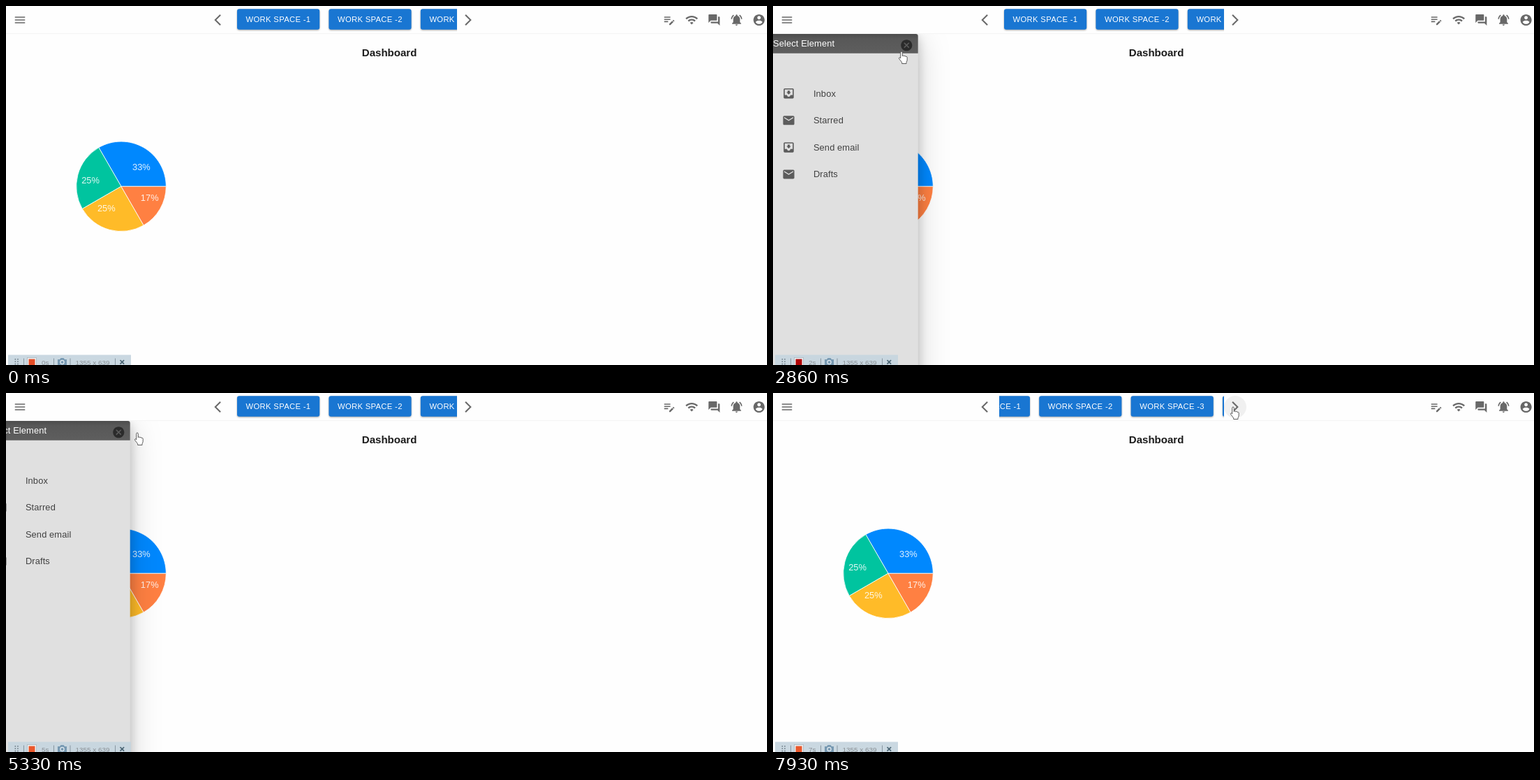
Recreate the animation shown at these times as an HTML page. Size 1090 by 514 pixels, loop 8 s.

```html
<!DOCTYPE html>
<html lang="en">
<head>
<meta charset="utf-8">
<title>Dashboard</title>
<style>
  html, body { margin: 0; width: 100%; height: 100%; overflow: hidden; background: #fefefe; }
  svg { display: block; width: 100%; height: 100%; }
  text { font: 12.87px "Liberation Sans", Arial, sans-serif; dominant-baseline: central; white-space: pre; }
  .title { font-size: 15.06px; font-weight: bold; fill: #1c1c1c; }
  .button rect { fill: #1976d2; filter: drop-shadow(0 1px 1.2px rgba(0,0,0,.35)); }
  .button text { font-size: 11.26px; letter-spacing: .322px; fill: #fff; }
  .icon { fill: #686868; }
  .halo { fill: #f0f0f0; }
  .slice { stroke: #fff; stroke-width: .8; }
  .percent { fill: #fff; fill-opacity: .88; }
  .panel { fill: #e0e0e0; filter: drop-shadow(0 5px 8px rgba(0,0,0,.2)) drop-shadow(0 8px 22px rgba(0,0,0,.18)); }
  .drawer text { letter-spacing: .12px; fill: #404040; }
  .drawer .heading { fill: #fff; }
  .drawer .icon { fill: #5c5c5c; }
  .drawer .close { fill: #2b2b2b; }
  .recorder text { font-size: 9.9px; fill: #8a9095; }
  #cursor path { fill: #fff; stroke: #4c4c4c; stroke-width: .9; stroke-linejoin: round; }
</style>
</head>
<body>
<svg id="stage" viewBox="0 0 1090 514">
  <defs>
    <clipPath id="carouselClip"><rect x="324" width="322" height="39"/></clipPath>
    <clipPath id="pageClip"><rect y="40" width="1090" height="474"/></clipPath>
    <linearGradient id="headerFill" x2="0" y2="1">
      <stop stop-color="#4c4c4c"/><stop offset=".25" stop-color="#585858"/><stop offset="1" stop-color="#5e5e5e"/>
    </linearGradient>
  </defs>
</svg>
<script>
const LOOP = 8000, STEP = 130;
const SCALE = .8044;
const ROW_TOP = 106, ROW_HEIGHT = 38.6;

const ICONS = {
  menu: 'M3 18h18v-2H3v2zm0-5h18v-2H3v2zm0-7v2h18V6H3z',
  back: 'M17.77 3.77 16 2 6 12l10 10 1.77-1.77L9.54 12z',
  next: 'M6.23 20.23 8 22l10-10L8 2 6.23 3.77 14.46 12z',
  note: 'M3 10h11v2H3v-2zm0-2h11V6H3v2zm0 8h7v-2H3v2zm15.01-3.13.71-.71c.39-.39 1.02-.39 1.41 0l.71.71c.39.39.39 1.02 0 1.41l-.71.71-2.12-2.12zm-.71.71-5.3 5.3V21h2.12l5.3-5.3-2.12-2.12z',
  wifi: 'm1 9 2 2c4.97-4.97 13.03-4.97 18 0l2-2C16.93 2.93 7.08 2.93 1 9zm8 8 3 3 3-3c-1.65-1.66-4.34-1.66-6 0zm-4-4 2 2c2.76-2.76 7.24-2.76 10 0l2-2C15.14 9.14 8.87 9.14 5 13z',
  chat: 'M21 6h-2v9H6v2c0 .55.45 1 1 1h11l4 4V7c0-.55-.45-1-1-1zm-4 6V3c0-.55-.45-1-1-1H3c-.55 0-1 .45-1 1v14l4-4h10c.55 0 1-.45 1-1z',
  bell: 'M7.58 4.08 6.15 2.65C3.75 4.48 2.17 7.3 2.03 10.5h2c.15-2.65 1.51-4.97 3.55-6.42zm12.39 6.42h2c-.15-3.2-1.73-6.02-4.12-7.85l-1.42 1.43c2.02 1.45 3.39 3.77 3.54 6.42zM18 11c0-3.07-1.64-5.64-4.5-6.32V4c0-.83-.67-1.5-1.5-1.5s-1.5.67-1.5 1.5v.68C7.63 5.36 6 7.92 6 11v5l-2 2v1h16v-1l-2-2v-5zm-6 11c.14 0 .27-.01.4-.04.65-.14 1.18-.58 1.44-1.18.1-.24.15-.5.15-.78h-4c.01 1.1.9 2 2.01 2z',
  account: 'M12 2C6.48 2 2 6.48 2 12s4.48 10 10 10 10-4.48 10-10S17.52 2 12 2zm0 3c1.66 0 3 1.34 3 3s-1.34 3-3 3-3-1.34-3-3 1.34-3 3-3zm0 14.2c-2.5 0-4.71-1.28-6-3.22.03-1.99 4-3.08 6-3.08 1.99 0 5.97 1.09 6 3.08-1.29 1.94-3.5 3.22-6 3.22z',
  inbox: 'M19 3H4.99c-1.11 0-1.98.9-1.98 2L3 19c0 1.1.88 2 1.99 2H19c1.1 0 2-.9 2-2V5c0-1.1-.9-2-2-2zm0 12h-4c0 1.66-1.35 3-3 3s-3-1.34-3-3H4.99V5H19v10zm-3-5h-2V7h-4v3H8l4 4 4-4z',
  mail: 'M20 4H4c-1.1 0-1.99.9-1.99 2L2 18c0 1.1.9 2 2 2h16c1.1 0 2-.9 2-2V6c0-1.1-.9-2-2-2zm0 4-8 5-8-5V6l8 5 8-5v2z',
  cancel: 'M12 2C6.47 2 2 6.47 2 12s4.47 10 10 10 10-4.47 10-10S17.53 2 12 2zm5 13.59L15.59 17 12 13.41 8.41 17 7 15.59 10.59 12 7 8.41 8.41 7 12 10.59 15.59 7 17 8.41 13.41 12 17 15.59z'
};

const icon = (name, x, y, extra = '') =>
  `<path class="icon ${extra}" d="${ICONS[name]}" transform="translate(${x} ${y}) scale(${SCALE}) translate(-12 -12)"/>`;
const text = (x, y, content, attrs = '') => `<text x="${x}" y="${y}" ${attrs}>${content}</text>`;
const halo = (id, x) => `<circle id="${id}" class="halo" cx="${x}" cy="20" r="16"/>`;

function pie() {
  const cx = 165, cy = 258.3, radius = 64.3;
  const point = (deg, r) => {
    const a = deg * Math.PI / 180;
    return [cx + r * Math.cos(a), cy - r * Math.sin(a)];
  };
  const slices = [[0, 120, '#0088fe', 33], [120, 210, '#00c49f', 25], [210, 300, '#ffbb28', 25], [300, 360, '#ff8042', 17]];
  return slices.map(([from, to, color, percent]) => {
    const [x, y] = point((from + to) / 2, radius / 2);
    return `<path class="slice" fill="${color}" d="M${cx} ${cy}L${point(from, radius)}A${radius} ${radius} 0 0 0 ${point(to, radius)}Z"/>`
      + text(x, y, percent + '%', `class="percent" text-anchor="${x > cx ? 'start' : 'end'}"`);
  }).join('');
}

const workspaceButton = (_, i) => {
  const x = 331 + i * 131.4;
  return `<g class="button"><rect x="${x}" y="4.3" width="118.2" height="29.5" rx="3.2"/>${text(x + 12.6, 18.9, 'WORK SPACE -' + (i + 1))}</g>`;
};

const drawerRow = (label, i) => {
  const y = ROW_TOP - 2.6 + 2.2 + ROW_HEIGHT * (i + .5);
  return icon(i % 2 ? 'mail' : 'inbox', 22.5, y + .3) + text(57.9, y + .1, label);
};

function recorder() {
  const dots = [0, 1, 2, 3, 4, 5].map(i =>
    `<rect x="${12.6 + i % 2 * 3.6}" y="${505 + (i >> 1) * 3.4}" width="1.5" height="1.5" fill="#66757f"/>`).join('');
  const bars = [25.5, 68.5, 92, 156.5].map(x => `M${x} 504.5V514`).join('');
  return `<g class="recorder">
    <rect x="3" y="499.5" width="176" height="15" fill="#c6d5df" fill-opacity=".92"/>${dots}
    <path d="${bars}" stroke="#8997a1"/>
    <rect x="30.5" y="503.5" width="13" height="13" fill="#eef1f3" stroke="#aab6be" stroke-width=".8"/>
    <rect id="record" x="32.5" y="505.5" width="9" height="9"/>
    <path d="M74 506h3l1.5-2h4l1.5 2h3v8.500h-13z" fill="#7799b2"/>
    <circle cx="80.500" cy="510" r="2.600" fill="none" stroke="#e3ecf2" stroke-width="1.200"/>
    ${text(51, 510, '', 'id="seconds"')}${text(99.6, 510, '1355 x 639')}
    <path d="M163.500 507l5.600 5.600m0-5.600l-5.600 5.600" stroke="#4c6675" stroke-width="1.700"/>
  </g>`;
}

document.getElementById('stage').insertAdjacentHTML('beforeend', `
  <rect width="1090" height="514" fill="#fefefe"/>
  <path d="M0 39.500H1090" stroke="#f4f4f4"/>
  ${text(509.8, 66.2, 'Dashboard', 'class="title"')}
  ${halo('menuHalo', 20)}${icon('menu', 20, 20)}
  ${icon('back', 303.2, 20)}
  <g clip-path="url(#carouselClip)"><g id="carousel">${[0, 1, 2, 3].map(workspaceButton).join('')}</g></g>
  ${halo('nextHalo', 662)}${icon('next', 662, 20)}
  ${['note', 'wifi', 'chat', 'bell', 'account'].map((name, i) => icon(name, 950 + i * 32.15, 20)).join('')}
  ${pie()}
  <g clip-path="url(#pageClip)"><g id="drawer" class="drawer">
    <rect class="panel" x="-10" y="40" width="217.700" height="520" rx="3.200"/>
    <path d="M-10 67.800V40H204.500Q207.700 40 207.700 43.200V67.800Z" fill="url(#headerFill)"/>
    ${text(0, 53.4, 'Select Element', 'class="heading"')}
    ${icon('cancel', 191.3, 56.2, 'close')}
    <rect id="rowHover" width="207.700" height="${ROW_HEIGHT}" fill="#d5d5d5"/>
    ${['Inbox', 'Starred', 'Send email', 'Drafts'].map(drawerRow).join('')}
  </g></g>
  ${recorder()}
  <g id="cursor">
    <path id="hand" d="M-1.300 1.500Q-1.300 0 0 0T1.300 1.500V6.700Q1.700 5.700 2.700 5.900T3.700 7Q4.300 6.200 5.300 6.500T6.100 7.600Q7 6.900 7.700 7.500T8.200 9V12Q8.200 14 7 15.500V17.500H.7V15.900Q-1.300 13-3.300 10.700Q-4.100 9.500-3.100 8.900T-1.300 9.800Z"/>
    <path id="arrow" d="M0 0V13L3 10.200L5 15L7 14.100L5 9.500H9.200Z"/>
  </g>`);

const byId = id => document.getElementById(id);
const [menuHalo, nextHalo, carousel, drawer, rowHover, record, seconds, cursor, hand, arrow] =
  ['menuHalo', 'nextHalo', 'carousel', 'drawer', 'rowHover', 'record', 'seconds', 'cursor', 'hand', 'arrow'].map(byId);

// Each key is [time, value, ...]
const POINTER = [[780, 230, -30], [1170, 42, 3], [1300, 20, 18], [1820, 20, 18], [2600, 172, 70], [2860, 184, 65],
  [3250, 116, 112], [4290, 100, 232], [4420, 100, 234], [5070, 188, 57], [5330, 188, 57],
  [5980, 314, 19], [6240, 330, 19], [7410, 655, 20], [7540, 659, 20]];
const DRAWER = [[1690, -250], [1820, -110], [1950, -14], [2080, 0], [5200, 0], [5330, -30], [5460, -180], [5590, -250]];
const CAROUSEL = [[7670, 0], [7800, -30], [7930, -81.2]];

function sample(keys, t) {
  const i = keys.findIndex(key => key[0] > t);
  if (i < 1) return (i ? keys[keys.length - 1] : keys[0]).slice(1);
  const [a, b] = [keys[i - 1], keys[i]];
  const p = (t - a[0]) / (b[0] - a[0]);
  return a.slice(1).map((v, k) => v + (b[k + 1] - v) * p);
}

const show = (node, visible) => node.setAttribute('visibility', visible ? 'visible' : 'hidden');
const move = (node, x, y = 0) => node.setAttribute('transform', `translate(${x} ${y})`);

function render(t) {
  const [x, y] = sample(POINTER, t);
  const [drawerX] = sample(DRAWER, t);
  const near = (cx, cy) => Math.hypot(x - cx, y - cy) < 16;
  const row = Math.floor((y - ROW_TOP) / ROW_HEIGHT);
  const overRow = drawerX === 0 && x < 207 && row >= 0 && row < 4;
  const overButtons = x > 324 && x < 646 && y > 4 && y < 34;
  const pointing = overRow || overButtons || near(20, 20) || near(191, 56) || near(303, 20) || near(662, 20);

  move(cursor, x, y);
  show(hand, pointing);
  show(arrow, !pointing);
  show(menuHalo, near(20, 20));
  show(nextHalo, near(662, 20));

  move(drawer, drawerX);
  show(drawer, drawerX > -250);
  rowHover.setAttribute('y', ROW_TOP - .4 + ROW_HEIGHT * row);
  rowHover.setAttribute('opacity', overRow ? 1 : 0);
  move(carousel, sample(CAROUSEL, t)[0]);

  // The record light fades between dark red and orange every two seconds.
  const glow = Math.min(1, Math.max(0, .5 - 1.2 * Math.cos((t - 600) * Math.PI / 1000)));
  record.setAttribute('fill', `rgb(${176 + 58 * glow} ${4 + 84 * glow} ${6 + 38 * glow})`);
  seconds.textContent = Math.floor(t / 1000) + 's';
}

const start = performance.now();
function tick() {
  const t = (performance.now() - start) % LOOP;
  render(Math.floor(t / STEP) * STEP);
  requestAnimationFrame(tick);
}
tick();
</script>
</body>
</html>
```
